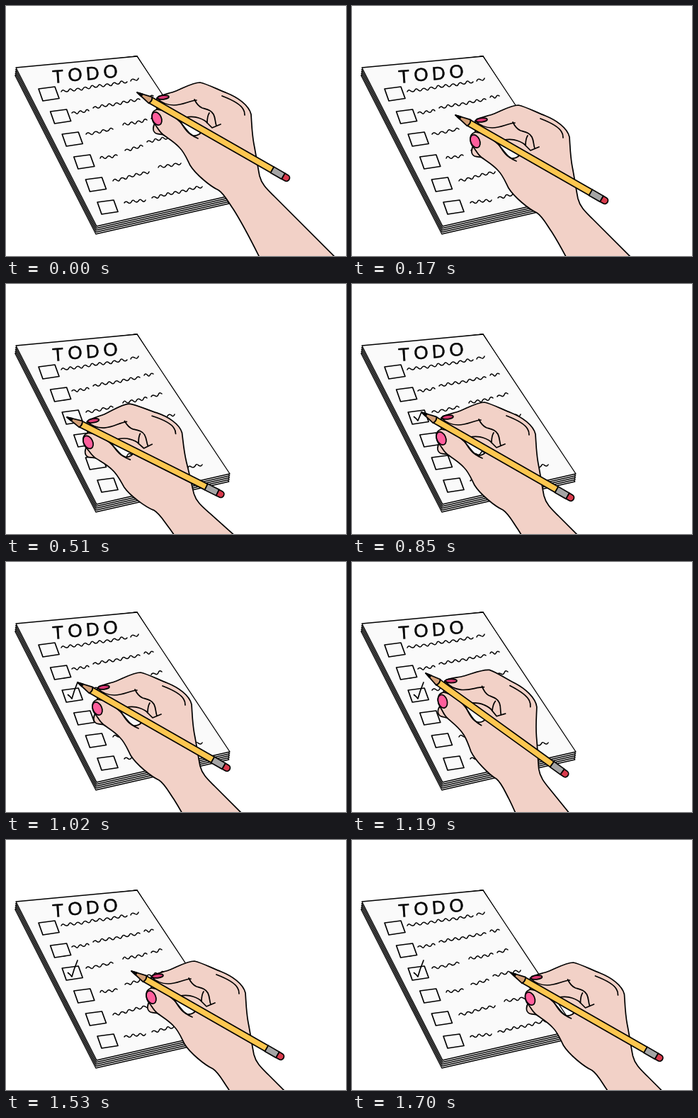
These frames come from a looping animation (480x353 px, 2890 ms). An HTML page:

```html
<!DOCTYPE html>
<html lang="en">
<head>
<meta charset="utf-8">
<title>To do</title>
<style>
  html, body { margin: 0; width: 100%; height: 100%; overflow: hidden; background: #fff; }
  svg { display: block; width: 100%; height: 100%; }
  .ink { fill: none; stroke: #000; stroke-width: 1.7; stroke-linecap: round; stroke-linejoin: round; }
  .skin { fill: #f2d1c7; fill-rule: evenodd; }
  #stack { stroke-width: 1.3; fill: #fafafa; }
  #lines { stroke-width: 1.5; }
  text { font: 26px "Liberation Sans", Arial, sans-serif; text-anchor: middle; stroke: #000; stroke-width: .5; }
</style>
</head>
<body>
<svg viewBox="0 0 480 353">
  <g id="stack" class="ink"></g>
  <text x="74 98 123 148" y="109 106.5 104.5 102" rotate="-4">TODO</text>
  <g id="boxes" class="ink"></g>
  <path id="lines" class="ink"/>
  <path id="check" class="ink"/>

  <g id="hand" class="ink">
    <path class="skin" d="M212 163C207 169 206 177 212 180C218 182 224 180 230 186L240 180Z"/>
    <path class="skin" d="M213 130C218 125 230 124 240 120C252 115 264 108 274 108C284 110 299 118 312 123
      C327 129 343 140 346 153C347 166 347 179 350 195C353 210 355 225 358 240C361 252 369 259 379 269
      L463 353L520 410L385 410L357 353C347 333 335 309 321 287C314 277 308 265 300 260
      C289 255 268 238 260 225C255 215 252 207 245 200C237 191 227 186 221 181C216 177 213 170 210 167
      C205 161 204 150 211 147L213 146Z
      M243 158L277 175C276 180 270 184 264 183C256 180 250 170 243 158Z"/>
    <path d="M213 146C226 147 238 156 246 164C254 173 258 182 271 187"/>
    <path d="M213 130C218 135 226 140 237 140C250 140 258 134 269 133"/>
    <path d="M266 132C269 138 272 142 277 144C284 146 290 147 293 153C296 159 295 164 297 169"/>
    <path d="M253 157C261 156 267 156 272 158C278 160 282 162 284 165C284 159 285 154 287 151"/>
    <path d="M284 165L291 172L303 167"/>
    <path d="M305 127C318 132 331 138 335 146Q337 149 337 154"/>
    <ellipse cx="222" cy="129" rx="8" ry="2.8" transform="rotate(-6 222 129)" fill="#d93a74"/>
    <ellipse cx="213" cy="159" rx="6.3" ry="9.6" transform="rotate(-24 213 159)" fill="#ff5e9c"/>
    <g transform="translate(185 122) rotate(29.8)">
      <path d="M0 0L22 -5Q25 0 22 5Z" fill="#d3a077"/>
      <path d="M0 0L8 -2V2Z" fill="#000"/>
      <path d="M22 -4.6H220V4.6H22Q25 0 22 -4.6Z" fill="#fdc750"/>
      <path d="M220 -4.8H238V4.8H220Z" fill="#a5a5a5"/>
      <path d="M238 -4.6H243C249 -4.6 249 4.6 243 4.6H238Z" fill="#d83a4c"/>
    </g>
  </g>
</svg>
<script>
const STEP = 170, LOOP = 2890;
const TIP = [185, 122];

// pencil tip x, y and turn about the tip in degrees
const poses = [
  [185, 122, 0], [146, 154, 0], [101, 170, -1], [86, 188, -3.2],
  [92, 193, -3.2], [98, 181, 0], [101, 170, 0], [104, 157, 6],
  [130, 172, 2], [177, 185, 0], [223.5, 187, 0]
];

// x1, y1, x2, y2 of each scribbled line
const scribbles = [
  [78, 121, 171, 107], [176, 106, 187, 102],
  [93, 151, 117, 148], [123, 144, 189, 132], [195, 129, 208, 127],
  [113, 181, 151, 174], [165, 168, 199, 161], [205, 159, 220, 155],
  [133, 215, 157, 211], [168, 204, 193, 198], [199, 192, 238, 184],
  [151, 247, 202, 234], [215, 228, 247, 222],
  [167, 278, 197, 274], [206, 271, 277, 255]
];

const byId = id => document.getElementById(id);

function addPath(parent, d) {
  const p = document.createElementNS("http://www.w3.org/2000/svg", "path");
  p.setAttribute("d", d);
  parent.append(p);
}

function wave([x1, y1, x2, y2]) {
  const len = Math.hypot(x2 - x1, y2 - y1);
  const n = Math.max(2, Math.round(len / 5.2));
  const nx = (y2 - y1) / len, ny = -(x2 - x1) / len;
  let d = `M${x1} ${y1}`;
  for (let i = 0; i < n; i++) {
    const amp = (i % 2 ? -1 : 1) * (3.3 + Math.sin(i * 2.3 + x1));
    const at = (a, b, k) => a + (b - a) * k / n;
    const cx = at(x1, x2, i + .5) + nx * amp;
    const cy = at(y1, y2, i + .5) + ny * amp;
    d += `Q${cx} ${cy} ${at(x1, x2, i + 1)} ${at(y1, y2, i + 1)}`;
  }
  return d;
}

for (let i = 4; i >= 0; i--) {
  const x = -.3 * i, y = 2.75 * i;
  addPath(byId("stack"), `M${14 + x} ${87 + y}L185 71L${316 + x} ${268 + y}L${128 + x} ${311 + y}Z`);
}
for (let i = 0; i < 6; i++) {
  addPath(byId("boxes"), `M${46 + 16.6 * i} ${117 + 32 * i}l23 -3l6 16.5l-23 3.5z`);
}
byId("lines").setAttribute("d", scribbles.map(wave).join(""));

function checkPath(step) {
  if (step < 4) return "";
  const stroke = "M87.5 187.5Q91 190 93 193";
  if (step === 4) return stroke;
  return stroke + (step === 5 ? "L98 181" : "Q96 182 101 170");
}

function draw(t) {
  const step = Math.min(poses.length - 1, Math.floor(t % LOOP / STEP));
  const [x, y, turn] = poses[step];
  byId("hand").setAttribute("transform",
    `translate(${x} ${y}) rotate(${turn}) translate(${-TIP[0]} ${-TIP[1]})`);
  byId("check").setAttribute("d", checkPath(step));
}

const start = performance.now();
function tick() {
  draw(performance.now() - start);
  requestAnimationFrame(tick);
}
tick();
</script>
</body>
</html>
```
